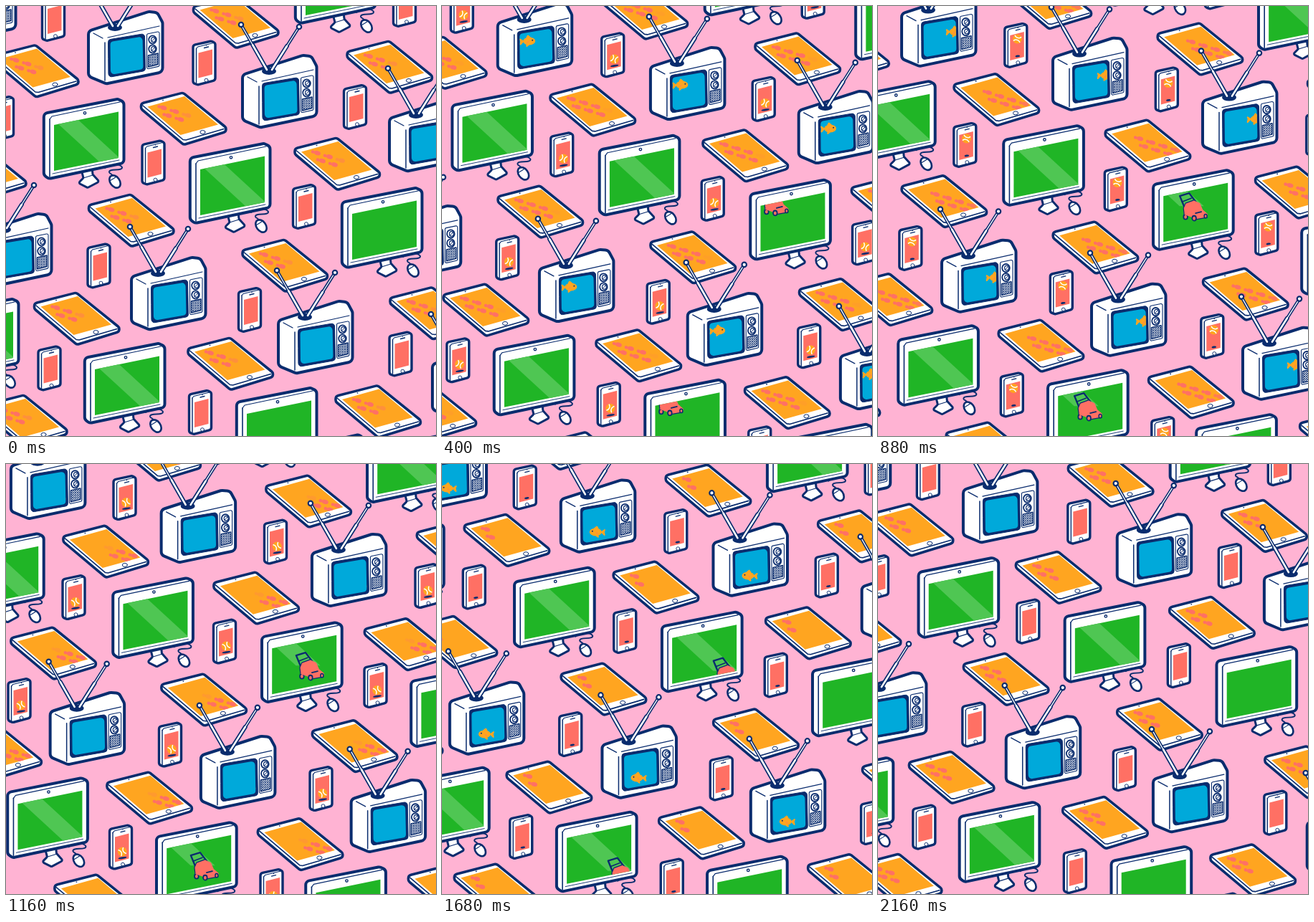
Write an HTML page with a canvas that moves like this. It is 600x600 px and loops after 2.2 s.

```html
<!DOCTYPE html>
<html lang="en">
<head>
<meta charset="utf-8">
<title>Gadget pattern</title>
<style>
html, body { margin: 0; width: 100%; height: 100%; overflow: hidden; background: #ffb3d3; }
canvas { display: block; width: 100vw; height: 100vh; }
</style>
</head>
<body>
<canvas id="stage" width="600" height="600"></canvas>
<script>
const ctx = document.getElementById('stage').getContext('2d');
const PINK = '#ffb3d3', NAVY = '#0a2c6e', CORAL = '#ff7064', ORANGE = '#ffa520';
const BLUE = '#00a9da', GREEN = '#20b526', MOWN = '#4fc653', WHITE = '#fff';
const LOOP = 2200, STEP = 40, FRAMES = LOOP / STEP;

// Closed polygon with corners rounded by r
function trace(p, r) {
  const n = p.length;
  ctx.beginPath();
  ctx.moveTo((p[n - 2] + p[0]) / 2, (p[n - 1] + p[1]) / 2);
  for (let i = 0; i < n; i += 2) {
    const x = p[(i + 2) % n], y = p[(i + 3) % n];
    ctx.arcTo(p[i], p[i + 1], (p[i] + x) / 2, (p[i + 1] + y) / 2, r);
  }
  ctx.closePath();
}

function paint(fill, width, stroke = NAVY) {
  if (fill) { ctx.fillStyle = fill; ctx.fill(); }
  if (width) { ctx.strokeStyle = stroke; ctx.lineWidth = width; ctx.stroke(); }
}

function poly(p, fill, width, r = 0) {
  trace(p, r);
  paint(fill, width);
}

function oval(x, y, rx, ry, fill, width, turn = 0) {
  ctx.beginPath();
  ctx.ellipse(x, y, rx, ry, turn, 0, Math.PI * 2);
  paint(fill, width);
}

function line(p, width, stroke = NAVY) {
  ctx.beginPath();
  ctx.moveTo(p[0], p[1]);
  for (let i = 2; i < p.length; i += 2) ctx.lineTo(p[i], p[i + 1]);
  paint(null, width, stroke);
}

function inside(p, r, draw) {
  ctx.save();
  trace(p, r);
  ctx.clip();
  draw();
  ctx.restore();
}

function at(x, y, draw) {
  ctx.save();
  ctx.translate(x, y);
  draw();
  ctx.restore();
}

/* ---- tablet with footprints ---- */

const PAD = [10.5, 21, 62, 6.5, 109, 46, 56.5, 60.5];

function footprint(i, f) {
  const on = 33 + 5.3 * i, off = 73 + 2.6 * i;
  const age = f < on - FRAMES + 0 || f + FRAMES < off + 3 ? f + FRAMES : f;
  const fade = Math.min(1, (age - on) / 2, (off + 1 - age) / 2);
  if (fade <= 0) return;
  const k = i >> 1, low = i % 2;
  ctx.globalAlpha = fade;
  at(31 + 17 * k + 7 * low, 22 + 5.3 * k + 11 * low, () => {
    ctx.rotate(0.3);
    oval(2, 0, 4.6, 3, CORAL);
    oval(-4.5, 0.3, 2.5, 2.2, CORAL);
  });
  ctx.globalAlpha = 1;
}

function tablet(f) {
  poly([1.5, 16.5, 60, 1.5, 120, 50, 120, 56, 61, 74, 1.5, 24], WHITE, 3.6, 5);
  line([4, 19.5, 60, 67, 64, 67.5, 117, 52], 1.6);
  poly(PAD, ORANGE);
  inside(PAD, 0, () => { for (let i = 0; i < 10; i++) footprint(i, f); });
  oval(87.5, 56.5, 3.6, 2.5, WHITE, 1);
  oval(32, 12, 1, 0.8, NAVY);
}

/* ---- phone with bouncing ball ---- */

const GLASS = [9, 18, 28.5, 13, 28.5, 48, 9, 53];

function ballHeight(f) {
  if (f < 10.5) return 34 * (1 - Math.pow(f / 10.5, 1.5));
  if (f < 29.5) return 18 * Math.sin(Math.PI * (f - 10.5) / 19);
  return 14 * Math.pow((f - 29.5) / 7.5, 1.6);
}

function ball(f) {
  const h = ballHeight(f);
  if (h > 33) return;
  oval(19.5, 47, 3.2 + 3.3 * Math.max(0, 1 - h / 12), 1.4, NAVY, 0, -0.15);
  at(19.2, 40 - h, () => {
    oval(0, 0, 6.5, 6.5, ORANGE);
    ctx.rotate(f * 0.12 - 0.8);
    ctx.beginPath();
    ctx.arc(-7, 0, 5.5, -0.9, 0.9);
    paint(null, 1.5, WHITE);
    ctx.beginPath();
    ctx.arc(7, 0, 5.5, Math.PI - 0.9, Math.PI + 0.9);
    paint(null, 1.5, WHITE);
  });
}

function phone(f) {
  poly([1.5, 7, 27, 1.5, 32.5, 4, 32.5, 56, 8, 62.5, 1.5, 60], WHITE, 3.4, 4);
  line([6, 12, 6, 60], 1.4);
  line([6, 12, 8, 9.5, 30, 4], 1.1);
  poly(GLASS, CORAL);
  inside(GLASS, 0, () => ball(f));
  oval(20, 56, 2.5, 2.3, WHITE, 0.9);
  line([17, 11, 23, 9.5], 1.3);
  oval(20, 7.5, 0.7, 0.7, NAVY);
}

/* ---- monitor with lawn mower ---- */

const LAWN = [16, 38, 106, 19.5, 106, 84, 16, 102];

function mowerSpot(f) {
  const u = f - 22 + 0.0007 * Math.pow(f - 26, 3);
  return [58 + 1.52 * u, 52 + 1.4 * u];
}

function mower(x, y) {
  at(x, y, () => {
    line([-12, 3, -19, -14, -6, -18, 4, -5], 2.4);
    line([-16, -6, -3, -11], 1.6);
    oval(-11, 15, 2.8, 3.4, CORAL, 1.8);
    poly([-14, 3, -11, -4, 0, -8, 9, -4, 13, 5, 20, 11, 19, 16, 2, 19, -4, 15, -13, 12], CORAL, 0, 2);
    line([-13, 11, -14, 3, -11, -4, 0, -8], 1.2);
    line([2, 19, 19, 16], 1.2);
    oval(1, 17, 2.8, 3.4, CORAL, 1.8);
    oval(17, 14, 2, 2.6, CORAL, 1.5);
    line([3, 10, 11, 8], 1.8);
  });
}

function stripe(end) {
  const mid = y => 60 + (y - 56) * 1.086;
  poly([mid(0) - 17, 0, mid(0) + 17, 0, mid(end) + 17, end, mid(end) - 17, end], MOWN);
}

function monitor(f, k, row) {
  // mouse and cable
  ctx.beginPath();
  ctx.moveTo(87, 98);
  ctx.bezierCurveTo(94, 92, 108, 92, 111, 97);
  ctx.bezierCurveTo(112, 103, 92, 98, 93, 104);
  ctx.bezierCurveTo(94, 107, 98, 105, 98, 111);
  paint(null, 1.9);
  oval(101, 117, 9.5, 6.6, WHITE, 2.6, 0.95);
  line([94.5, 115.5, 99.5, 112.5, 103, 110], 1.1);
  // stand
  poly([54, 100, 69, 97, 70, 107, 79, 117, 63, 125.5, 50, 119, 57, 112], WHITE, 3, 2);
  line([57, 112, 70, 108], 1.1);
  // case
  poly([1.8, 22, 105, 1.8, 113.5, 6, 113.5, 91, 9, 113, 1.8, 108], WHITE, 4, 6);
  line([10, 30, 10, 110], 1.6);
  line([10, 30, 13, 26, 108, 6], 1.2);
  line([14, 106, 107, 87], 0.9);
  oval(59, 21.3, 1.7, 1.7, WHITE, 1.4);
  poly(LAWN, GREEN);
  inside(LAWN, 0, () => {
    if (row < 0 || k < 2) stripe(120);
    else if (k === 2) {
      const [x, y] = mowerSpot(f);
      if (y > 0) stripe(y);
      mower(x, y);
    }
  });
}

/* ---- television with goldfish ---- */

const TUBE = [32.5, 44, 77.5, 36.5, 78.5, 82, 33, 90];

function goldfish(x, y, dir, f) {
  at(x, y, () => {
    ctx.scale(dir, 1);
    ctx.rotate(0.06 * Math.sin(f * 0.6));
    const wag = 1.2 * Math.sin(f * 0.9);
    poly([-5, 0, -13, -6 + wag, -10.5, 0, -12, 7 + wag], ORANGE, 0, 1);
    poly([-3, -4, 0, -9, 6, -4], ORANGE, 0, 1);
    poly([-2, 4, -3, 9, 3, 5], ORANGE, 0, 1);
    oval(2, 0, 8.5, 5.5, ORANGE);
    oval(6.5, -1.3, 1, 1, NAVY);
    line([1, 0.5, -1, 2.5], 0.9, CORAL);
  });
}

function rod(x, y, tx, ty) {
  const mx = x + (tx - x) * 0.55, my = y + (ty - y) * 0.55;
  line([x, y, tx, ty], 4.4);
  line([x, y, mx, my], 6);
  line([x, y, tx, ty], 1.3, WHITE);
  line([x, y, mx, my], 2.6, WHITE);
  oval(tx, ty, 3.2, 3.2, WHITE, 2.2);
}

function tv(f) {
  poly([2, 29, 86, 2, 98, 3, 105.5, 17, 105.5, 86, 27, 102.5, 2, 92], WHITE, 4, 7);
  line([25, 45, 25, 98], 1.5);
  line([9, 32, 22, 39], 1.3);
  line([29, 38, 101, 22], 1.2);
  poly([29.5, 41, 80.5, 32.5, 81.5, 84.5, 30, 93.5], NAVY, 1, 4);
  poly(TUBE, BLUE, 0, 5);
  inside(TUBE, 5, () => {
    goldfish(44 + 2.6 * (f - 10), 54 + Math.sin(f * 0.3), 1, f);
    goldfish(66.5 - 2.8 * (f - 37), 74.5 + Math.sin(f * 0.3), -1, f);
  });
  // control panel
  poly([83.5, 33, 101, 29.5, 101, 78, 83.5, 82], WHITE, 1.1, 2);
  for (const y of [41, 54]) {
    oval(91.5, y, 5.3, 5.6, WHITE, 1.8);
    oval(92.5, y, 2.9, 3.3, WHITE, 1.2);
    line([90.5, y + 2, 94.5, y - 2], 1);
  }
  const mesh = [85.5, 63, 99, 60, 99, 75.5, 85.5, 79];
  poly(mesh, WHITE, 1.4);
  inside(mesh, 0, () => {
    for (let i = -6; i < 12; i++) {
      const x = 84 + i * 2.8;
      line([x, 58, x + 22, 80], 0.9);
      line([x, 80, x + 22, 58], 0.9);
    }
  });
  // aerial
  oval(39, 24, 10, 5, NAVY);
  rod(36, 22, 0, -41);
  rod(43, 22, 81, -38);
}

/* ---- pattern ---- */

// Each row is a chain of places: start at k = 0, then two alternating steps
const KINDS = [
  { draw: tablet, start: [-19, 53], steps: [[206, 66.5], [214.5, 63]],
    rows: [[73, -135], [0, 0], [-73, 142], [-149, 279], [-222, 422]] },
  { draw: phone, start: [49, -14], steps: [[210.5, 61.5], [210.5, 61.5]],
    rows: [[69, -143], [0, 0], [-71, 139], [-147, 283], [-216, 426]] },
  { draw: monitor, start: [51, 128], steps: [[204, 62], [212, 62]],
    rows: [[147, -279], [0, 0], [-147, 279]], first: -1 },
  { draw: tv, start: [113, 6], steps: [[215, 61], [205, 61]],
    rows: [[0, 0], [-155, 282]] }
];

function place(kind, row, k, axis) {
  const [a, b] = kind.steps, pairs = Math.floor(k / 2);
  return kind.start[axis] + row[axis] + pairs * (a[axis] + b[axis]) + (k - 2 * pairs) * a[axis];
}

function render(ms) {
  const f = Math.floor((ms % LOOP) / STEP), p = f / FRAMES;
  ctx.fillStyle = PINK;
  ctx.fillRect(0, 0, 600, 600);
  ctx.lineJoin = ctx.lineCap = 'round';
  for (const kind of KINDS) {
    kind.rows.forEach((row, r) => {
      for (let k = -1; k < 6; k++) {
        const [x, y] = [0, 1].map(axis =>
          place(kind, row, k, axis) * (1 - p) + place(kind, row, k - 1, axis) * p);
        if (x < -130 || x > 610 || y < -140 || y > 650) continue;
        at(x, y, () => kind.draw(f, k, r + (kind.first || 0)));
      }
    });
  }
}

const begin = performance.now();
function tick() {
  render(Math.max(0, performance.now() - begin));
  requestAnimationFrame(tick);
}
tick();
</script>
</body>
</html>
```
